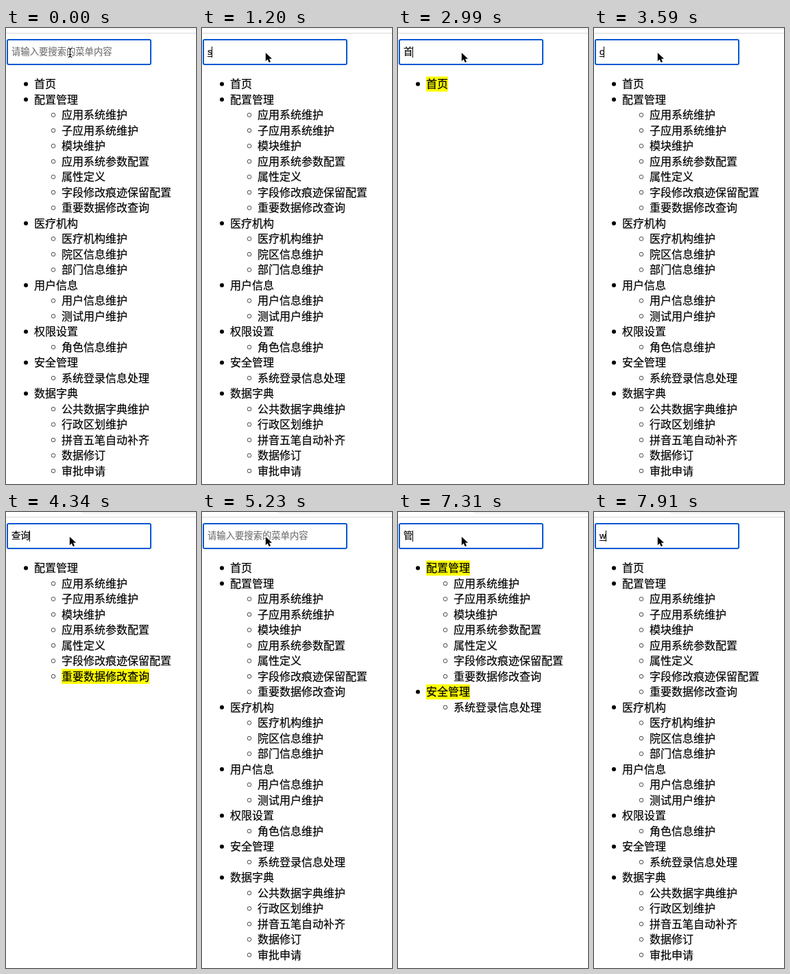
Animation of 277 by 663 pixels, one loop 8 s. Source, as an HTML page with a canvas:

```html
<!DOCTYPE html>
<html lang="zh-CN">
<head>
<meta charset="utf-8">
<title>菜单搜索</title>
<style>
html, body { margin: 0; width: 100%; height: 100%; overflow: hidden; background: #fff; }
canvas { display: block; width: 277px; height: 663px; }
</style>
</head>
<body>
<canvas id="stage"></canvas>
<script>
const W = 277, H = 663, LOOP = 8000;
const BLUE = '#0759d3';
const FONT = '"Liberation Sans", "Noto Sans CJK SC", "Noto Sans CJK", sans-serif';

const MENU = [
  '首页',
  '配置管理 应用系统维护 子应用系统维护 模块维护 应用系统参数配置 属性定义 字段修改痕迹保留配置 重要数据修改查询',
  '医疗机构 医疗机构维护 院区信息维护 部门信息维护',
  '用户信息 用户信息维护 测试用户维护',
  '权限设置 角色信息维护',
  '安全管理 系统登录信息处理',
  '数据字典 公共数据字典维护 行政区划维护 拼音五笔自动补齐 数据修订 审批申请'
].map(group => group.split(' '));

// [start ms, field text, caret visible, composing, candidates]
const STEPS = [
  [0, '', false],
  [300, '', true],
  [900, '', false],
  [1200, 's', true, true],
  [1340, 'shou', true, true, '手 收 受 首 守 瘦 售'],
  [1490, 'shou y', true, true, '首页 受益 手游 收益 手艺'],
  [1790, 'shou ye', true, true, '首页 守夜 授业 授业解惑 守业'],
  [1940, '首页', true],
  [2390, '首页', false],
  [2990, '首', true],
  [3140, '', true],
  [3440, '', false],
  [3590, 'c', true, true],
  [3740, 'cha', true, true, '查 差 茶 插 叉 察 岔'],
  [3890, 'cha x', true, true, '查询 差些 查下 查 差'],
  [4190, 'cha xun', true, true, '查询 查寻 查 差 茶 插'],
  [4340, '查询', true],
  [4940, '查', true],
  [5090, '', true],
  [5230, '', false],
  [5380, '', true],
  [5830, 'g', true, true],
  [5980, 'gu', true, true, '故 古 股 顾 骨 谷 鼓'],
  [6120, 'guan', true, true, '关 管 观 官 馆 惯 冠'],
  [6270, 'guan l', true, true, '管理 关联 惯例 官僚 管路'],
  [6420, 'guan li', true, true, '管理 管栎 惯例 官吏 馆里'],
  [6570, '管理', true],
  [7020, '管理', false],
  [7310, '管', true],
  [7460, '', true],
  [7610, '', false],
  [7910, 'w', true, true]
];

const canvas = document.getElementById('stage');
const ctx = canvas.getContext('2d');
const dpr = window.devicePixelRatio || 1;
canvas.width = W * dpr;
canvas.height = H * dpr;

function rect(x, y, w, h, color) {
  ctx.fillStyle = color;
  ctx.fillRect(x, y, w, h);
}

function rounded(x, y, w, h, r) {
  ctx.beginPath();
  ctx.roundRect(x, y, w, h, r);
}

// A hairline outline gives the slightly heavier system-font weight.
function text(str, x, y, size, color) {
  ctx.font = `${size}px ${FONT}`;
  ctx.fillStyle = ctx.strokeStyle = color;
  ctx.lineWidth = 0.2;
  ctx.lineJoin = 'round';
  ctx.fillText(str, x, y);
  ctx.strokeText(str, x, y);
}

function drawToolbar() {
  ctx.fillStyle = '#f0f1f2';
  rounded(107, -20, 200, 22.5, 8);
  ctx.fill();
  rect(0, 7, W, 1, '#d9d9db');
}

function drawBullet(x, y, filled) {
  ctx.beginPath();
  ctx.arc(x, y, filled ? 3 : 2.8, 0, Math.PI * 2);
  ctx.fillStyle = ctx.strokeStyle = '#000';
  ctx.lineWidth = 0.7;
  filled ? ctx.fill() : ctx.stroke();
}

function drawMenu(query) {
  const hit = label => query && label.includes(query);
  let y = 81;
  for (const group of MENU) {
    if (query && !group.some(hit)) continue;
    group.forEach((label, i) => {
      const x = i ? 81 : 41;
      if (hit(label)) rect(x, y - 10.5, label.length * 16, 22, '#ff0');
      drawBullet(x - 12, y + 0.5, !i);
      text(label, x, y + 6, 16, '#000');
      y += 22.5;
    });
  }
}

function drawField(value, caret, composing) {
  ctx.strokeStyle = BLUE;
  ctx.lineWidth = 2;
  rounded(2, 17, 209, 36, 2);
  ctx.stroke();
  const size = 13.333;
  if (!value) text('请输入要搜索的菜单内容', 8, 39.4, size, '#757575');
  text(value, 8, composing ? 39 : 39.4, size, '#000');
  const width = ctx.measureText(value).width;
  if (composing) rect(8, 41, width, 1, '#000');
  if (caret) rect(Math.floor(8 + width), 27, 1, 16, '#000');
}

function drawCandidates(list) {
  ctx.save();
  ctx.shadowColor = 'rgba(0,0,0,.3)';
  ctx.shadowBlur = 10 * dpr;
  ctx.shadowOffsetY = 2 * dpr;
  rect(-8, 48, W + 16, 31.5, '#f6f6f6');
  ctx.restore();
  ctx.fillStyle = BLUE;
  let x = 14.5;
  list.split(' ').forEach((word, i) => {
    const width = word.length * 16;
    if (!i) {
      rounded(1, 51, 51, 26, 5);
      if (width < 32) rounded(1, 51, width + 19, 26, 5);
      ctx.fill();
    }
    text(i + 1, x - 11, 68, 11.5, i ? '#7c7c7c' : '#fff');
    text(word, x, 69, 16, i ? '#484848' : '#fff');
    x += width + 25;
  });
}

function drawBeam() {
  const beam = new Path2D('M90.5 29.5Q93.5 29.5 93.5 32V40Q93.5 42.5 90.5 42.5M96.5 29.5Q93.5 29.5 93.5 32M93.5 40Q93.5 42.5 96.5 42.5M91.5 38.5H95.5');
  for (const [width, color] of [[2.6, '#fff'], [1.1, '#000']]) {
    ctx.lineWidth = width;
    ctx.strokeStyle = color;
    ctx.stroke(beam);
  }
}

function drawArrow() {
  const arrow = new Path2D('M92.8 36V48.3L95.7 45.6L97.8 50.2L100 49.2L98 44.8H102Z');
  ctx.lineWidth = 1.8;
  ctx.lineJoin = 'round';
  ctx.strokeStyle = '#fff';
  ctx.stroke(arrow);
  ctx.fillStyle = '#000';
  ctx.fill(arrow);
}

function render(t) {
  const [, value, caret, composing, candidates] = STEPS.findLast(step => step[0] <= t);
  ctx.setTransform(dpr, 0, 0, dpr, 0, 0);
  rect(0, 0, W, H, '#fff');
  drawToolbar();
  drawMenu(composing ? '' : value);
  drawField(value, caret, composing);
  if (candidates) drawCandidates(candidates);
  t < 1200 ? drawBeam() : drawArrow();
}

const start = performance.now();
function frame() {
  render((performance.now() - start) % LOOP);
  requestAnimationFrame(frame);
}
frame();
</script>
</body>
</html>
```
